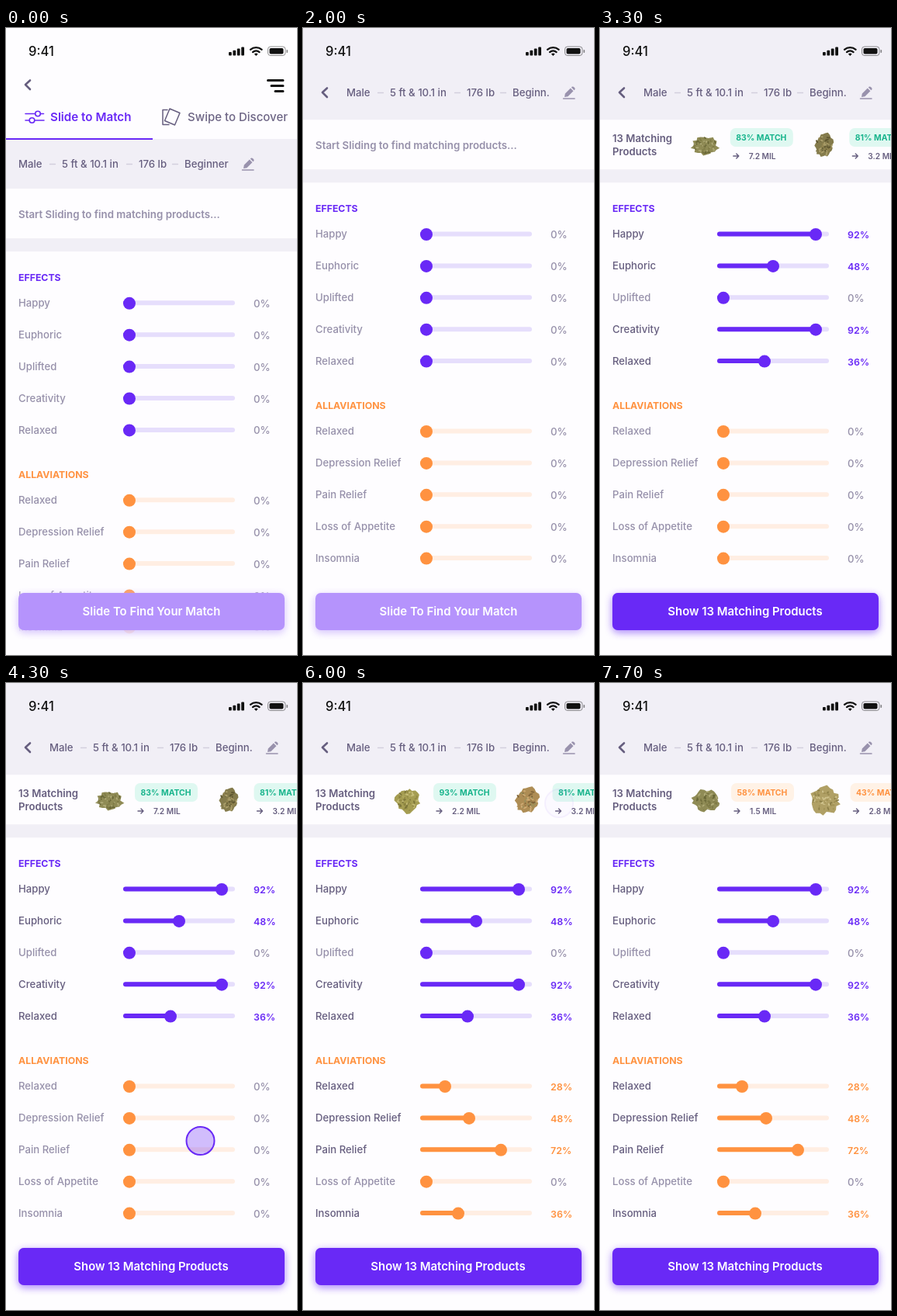
An HTML page for the animation above (8000 ms loop, 375 by 808 pixels).

```html
<!DOCTYPE html>
<html lang="en">
<head>
<meta charset="utf-8">
<title>Slide to match</title>
<style>
  html, body { margin: 0; height: 100%; overflow: hidden; background: #f1eff6; }
  svg { display: block; width: 100vw; height: 100vh; }
  text { font-family: Inter, "Open Sans", sans-serif; font-size: 13.2px; font-weight: 500; }
</style>
</head>
<body>
<svg id="stage" viewBox="0 0 375 808"></svg>
<script>
const LOOP = 8000;
const PURPLE = '#6929f6', ORANGE = '#ff9240', DARK = '#665e7f', MUTED = '#9690aa', WHITE = '#fefdff';
const PITCH = 153.5;

// Time helpers
const clamp = x => Math.max(0, Math.min(1, x));
const mix = (a, b, p) => a + (b - a) * p;
const bezier = (x1, y1, x2, y2) => x => {
  if (x <= 0 || x >= 1) return clamp(x);
  const at = (a, b, s) => 3 * (1 - s) ** 2 * s * a + 3 * (1 - s) * s * s * b + s ** 3;
  let lo = 0, hi = 1;
  for (let i = 0; i < 24; i++) {
    const mid = (lo + hi) / 2;
    if (at(x1, x2, mid) < x) lo = mid; else hi = mid;
  }
  return at(y1, y2, lo);
};
const linear = x => x;
const ease = bezier(.25, .1, .25, 1), easeOut = bezier(0, 0, .58, 1), easeInOut = bezier(.42, 0, .58, 1);
const span = (t, from, to, fn = linear) => fn(clamp((t - from) / (to - from)));
const pulse = (t, inA, inB, outA, outB) => span(t, inA, inB) * (1 - span(t, outA, outB));

// Markup helpers
const text = (x, y, str, fill = DARK, attrs = '') => `<text x="${x}" y="${y}" fill="${fill}" ${attrs}>${str}</text>`;
const style = (size, weight) => `style="font-size:${size}px;font-weight:${weight}"`;
const rect = (x, y, w, h, fill, rx = 0, attrs = '') =>
  `<rect x="${x}" y="${y}" width="${w}" height="${h}" rx="${rx}" fill="${fill}" ${attrs}/>`;
const line = (d, stroke, width, attrs = '') =>
  `<path d="${d}" fill="none" stroke="${stroke}" stroke-width="${width}" stroke-linecap="round" stroke-linejoin="round" ${attrs}/>`;

// label, final percent, knob travel, start, end
const groups = [
  { title: 'EFFECTS', y: 354.8, color: PURPLE, track: '#e6defc', rows: [
    ['Happy', 92, 119, 2310, 3270], ['Euphoric', 48, 64, 2310, 3108], ['Uplifted', 0, 0, 0, 1],
    ['Creativity', 92, 119, 2310, 3270], ['Relaxed', 36, 53, 2310, 2970]] },
  { title: 'ALLAVIATIONS', y: 608.8, color: ORANGE, track: '#ffeee3', rows: [
    ['Relaxed', 28, 24, 4400, 5050], ['Depression Relief', 48, 55, 4400, 5150], ['Pain Relief', 72, 96, 4400, 5280],
    ['Loss of Appetite', 0, 0, 0, 1], ['Insomnia', 36, 41, 4400, 5100]] }
];
const sliders = [];

function sliderGroup({ title, y, color, track, rows }) {
  const body = rows.map(([label, value, travel, from, to], i) => {
    const id = 's' + sliders.length, cy = y + 40.9 * i;
    sliders.push({ id, value, travel, from, to, color });
    return text(16, cy + 4.5, label, MUTED, `id="${id}label"`) +
      rect(151, cy - 3.5, 144, 6, track, 3) + rect(151, cy - 3.5, 8, 6, color, 3, `id="${id}fill"`) +
      `<circle id="${id}knob" cx="159" cy="${cy}" r="8" fill="${color}"/>` +
      text(319, cy + 5, '0%', MUTED, `id="${id}value"`);
  }).join('');
  return text(16, y - 29.1, title, color, style(12.3, 700)) + body;
}

// A rough bud: jagged silhouette with seeded speckles
function bud(cx, cy, w, h, seed, tones) {
  const rnd = () => (seed = (seed * 16807) % 2147483647) / 2147483647;
  const pts = Array.from({ length: 26 }, (_, i) => {
    const a = i / 26 * Math.PI * 2, r = .72 + rnd() * .32;
    return `${(cx + Math.cos(a) * w / 2 * r).toFixed(1)},${(cy + Math.sin(a) * h / 2 * r).toFixed(1)}`;
  });
  let out = `<polygon points="${pts.join(' ')}" fill="${tones[0]}"/>`;
  for (let i = 0; i < 60; i++) {
    const a = rnd() * 6.28, r = Math.sqrt(rnd()) * .76;
    const x = cx + Math.cos(a) * w / 2 * r, y = cy + Math.sin(a) * h / 2 * r;
    out += `<ellipse cx="${x.toFixed(1)}" cy="${y.toFixed(1)}" rx="${(1 + rnd() * 1.6).toFixed(1)}" ry="1"
      transform="rotate(${Math.round(rnd() * 180)} ${x.toFixed(1)} ${y.toFixed(1)})" fill="${tones[i % tones.length]}"/>`;
  }
  return out;
}
const green = ['#8f8b55', '#6a6838', '#b0ab78', '#7f7b46'];
const brown = ['#847b4c', '#5f5731', '#aca06c', '#928450'];
const lime = ['#a59d52', '#7b7439', '#c6bd78', '#938a45'];
const amber = ['#ae8d55', '#806439', '#d0ac76', '#9a905c'];
const straw = ['#b0a065', '#8c7f48', '#cfc28d', '#a19155'];

function product(i, x0, [match, amount, w, h, tones]) {
  const x = x0 + i * PITCH, good = match > 70;
  return bud(x - 32.5, 151.5, w, h, match * 37 + i, tones) +
    rect(x, 129, 81, 24, good ? '#dff8f1' : '#fff2e6', 7) +
    text(x + 7.5, 145, match + '% MATCH', good ? '#18b48c' : ORANGE, style(10.4, 700)) +
    line(`M${x + 4} 165 h7 m-3 -3 l3 3 l-3 3`, DARK, 1.4) +
    text(x + 24, 169, amount + ' MIL', DARK, style(10.2, 600));
}
const firstProducts = [[83, 7.2, 38, 27, green], [81, 3.2, 27, 35, brown]];
const finalProducts = [[93, 2.2, 35, 34, lime], [81, 3.2, 35, 38, amber], [64, 1.2, 36, 34, brown],
  [58, 1.5, 39, 30, green], [43, 2.8, 42, 40, straw]];
const productList = (list, x0) => list.map((p, i) => product(i, x0, p)).join('');

const dash = x => line(`M${x} 175.5 h7`, '#d3cfdd', 1.3);

stage.innerHTML = `
<defs>
  <linearGradient id="bottomFade" x2="0" y2="1">
    <stop offset="0" stop-color="${WHITE}" stop-opacity="0"/><stop offset=".45" stop-color="${WHITE}" stop-opacity=".75"/>
    <stop offset="1" stop-color="${WHITE}"/></linearGradient>
  <linearGradient id="leftFade">
    <stop offset=".88" stop-color="${WHITE}"/><stop offset="1" stop-color="${WHITE}" stop-opacity="0"/></linearGradient>
  <filter id="blur" x="-20%" y="-60%" width="140%" height="220%"><feGaussianBlur stdDeviation="5"/></filter>
</defs>
${rect(0, 0, 375, 808, '#f1eff6')}
<g id="list">
  ${rect(0, 207, 375, 64, WHITE)}${rect(0, 288, 375, 640, WHITE)}
  ${text(16, 244.5, 'Start Sliding to find matching products...', MUTED, `id="hint" style="font-size:13.3px;font-weight:600"`)}
  ${groups.map(sliderGroup).join('')}
</g>
<g id="strip">
  <g id="firstList">${productList(firstProducts, 166)}</g>
  <g id="finalList">${productList(finalProducts, 168)}</g>
  ${rect(0, 121, 119, 60, 'url(#leftFade)')}
  ${text(16, 147, '', DARK, `id="count" style="font-weight:600"`)}
  ${text(16, 164, 'Products', DARK, style(13.2, 600))}
</g>
<g id="tabs">
  ${rect(0, 0, 375, 143, WHITE)}
  <g id="tabItems">
    ${line('M25 110.5 h12.5 m7 0 h4 M25 119 h5 m7 0 h12', PURPLE, 1.6)}
    <g fill="none" stroke="${PURPLE}" stroke-width="1.6"><circle cx="41" cy="110.5" r="3.3"/><circle cx="33.5" cy="119" r="3.3"/></g>
    ${text(57, 120, 'Slide to Match', PURPLE, style(15.2, 600))}
    ${line('M211 104 L224 109.5 L217.5 125 L204.5 119.5 Z M208 105.5 H202 V124.5 H210', DARK, 1.5)}
    ${text(234, 120, 'Swipe to Discover', '#6d6585', style(15, 500))}
    ${line('M337.5 67.5 H357 M342 74.5 H357 M347 81.5 H357', '#111', 3)}
  </g>
  ${rect(0, 142, 189, 2, PURPLE)}
</g>
<g id="info">
  ${text(16, 180, 'Male')}${dash(56.5)}${text(72, 180, '5 ft &amp; 10.1 in')}${dash(155.5)}
  ${text(171, 180, '176 lb')}${dash(214.5)}
  ${text(230, 180, 'Beginner', DARK, 'id="levelLong"')}${text(230, 180, 'Beginn.', DARK, 'id="levelShort"')}
</g>
<g id="pen">
  <path d="M306 181 L306.8 176.6 L313.8 169.6 L317.4 173.2 L310.4 180.2 Z M314.8 168.6 L316 167.6 Q317 167 318 168 L319 169 Q320 170 319.4 171.2 L318.4 172.2 Z" fill="#9992ad"/>
  ${line('M304.5 183 H319', '#9992ad', 1.5)}
</g>
<g id="back">${line('M31 67.5 L25 73 L31 79', DARK, 2.6)}</g>
<g id="status">
  ${text(29, 36, '9:41', '#111', style(16.6, 500))}
  ${[0, 1, 2, 3].map(i => rect(287 + i * 5.4, 31 - i * 2.2, 3.8, 4.5 + i * 2.2, '#111', 1)).join('')}
  ${line('M315 27.8 a11 11 0 0 1 14.6 0 M318 31.1 a6.6 6.6 0 0 1 8.6 0', '#111', 2.3)}
  <path d="M319.9 33.4 Q322.3 31.8 324.7 33.4 L322.3 36 Z" fill="#111"/>
  ${rect(337.5, 24, 22.5, 11.5, 'none', 3.4, 'stroke="#111" stroke-opacity=".45"')}
  ${rect(339.5, 26, 18, 7.5, '#111', 1.8)}${rect(361.5, 28, 1.6, 4, '#111', .8, 'opacity=".5"')}
</g>
${rect(0, 715, 375, 93, 'url(#bottomFade)')}
${rect(15, 730, 345, 50, PURPLE, 9, 'id="glow" filter="url(#blur)"')}
${rect(16, 728, 343, 48, '#b593fc', 7)}
${rect(16, 728, 343, 48, PURPLE, 7, 'id="buttonOn"')}
${text(187.5, 757, 'Slide To Find Your Match', '#fff', `id="buttonIdle" text-anchor="middle" ${style(14.9, 600)}`)}
${text(187, 757, '', '#fff', `id="buttonShow" text-anchor="middle" ${style(14.9, 600)}`)}
${rect(0, 0, 0, 0, PURPLE, 0, `id="pointer" fill-opacity=".3" stroke="${PURPLE}" stroke-width="2"`)}`;

const el = id => document.getElementById(id);
const set = (id, attrs) => { for (const k in attrs) el(id).setAttribute(k, attrs[k]); };
const move = (id, x, y) => set(id, { transform: `translate(${x} ${y})` });
const fade = (id, opacity) => set(id, { opacity });

// A round touch mark, stretched between head and tail
function placePointer(x1, y1, x2, y2, r, opacity) {
  set('pointer', {
    x: Math.min(x1, x2) - r, y: Math.min(y1, y2) - r, rx: r, opacity,
    width: Math.abs(x1 - x2) + 2 * r, height: Math.abs(y1 - y2) + 2 * r
  });
}

function drawPointer(t, scroll) {
  if (t < 3000) {
    const head = mix(421.5, 308, scroll), tail = mix(421.5, 308, span(t, 1200, 1600, easeOut));
    placePointer(314, head, 314, tail, 24.5, pulse(t, 840, 1000, 1350, 1640));
  } else if (t < 5900) {
    const r = mix(24, 18, span(t, 3950, 4250, easeOut));
    placePointer(250.5, 590, 250.5, 590, r, pulse(t, 3950, 4200, 4400, 4650));
  } else {
    const head = mix(330, 90, span(t, 6105, 6800, ease)), tail = mix(330, 90, span(t, 6250, 6950, ease));
    placePointer(head, 155, tail, 155, 18, pulse(t, 5990, 6180, 6500, 6850));
  }
}

function drawSlider({ id, value, travel, from, to, color }, t) {
  const p = value ? span(t, from, to, easeInOut) : 0, shown = Math.round(value * p), on = shown > 0;
  set(id + 'knob', { cx: 159 + travel * p });
  set(id + 'fill', { width: 8 + travel * p });
  set(id + 'label', { fill: on ? DARK : MUTED });
  const label = el(id + 'value');
  label.textContent = shown + '%';
  label.setAttribute('fill', on ? color : MUTED);
  label.style.fontWeight = on ? 600 : 500;
  label.style.fontSize = on ? '12.4px' : '13.2px';
}

function render(t) {
  const scroll = span(t, 840, 1640, easeOut);
  move('list', 0, -88.8 * scroll);
  move('tabs', 0, -151 * scroll);
  fade('tabItems', 1 - .5 * scroll);
  move('info', 40 * scroll, -92 * scroll);
  move('pen', 31 * scroll, -92 * scroll);
  move('back', 0, 10 * scroll);
  fade('levelLong', 1 - scroll);
  fade('levelShort', clamp(scroll * 3 - 2));

  sliders.forEach(s => drawSlider(s, t));

  const found = Math.round(mix(60, 13, span(t, 2310, 3270, easeInOut)));
  el('count').textContent = found + ' Matching';
  el('buttonShow').textContent = `Show ${found} Matching Products`;
  const on = span(t, 2340, 2840, easeOut), swap = span(t, 2340, 2600);
  fade('buttonOn', on);
  fade('glow', mix(.25, .5, on));
  fade('buttonIdle', 1 - swap);
  fade('buttonShow', swap);

  fade('hint', 1 - span(t, 2340, 2915));
  fade('strip', span(t, 2810, 3300));
  const renew = span(t, 4800, 5200);
  fade('firstList', 1 - renew);
  fade('finalList', renew);
  move('firstList', 40 * (1 - span(t, 2810, 3400, easeOut)), 0);
  move('finalList', -(3 * PITCH - 1) * span(t, 6105, 7710, ease), 0);

  drawPointer(t, scroll);
}

const start = performance.now();
function tick() {
  render((performance.now() - start) % LOOP);
  requestAnimationFrame(tick);
}
tick();
</script>
</body>
</html>
```
